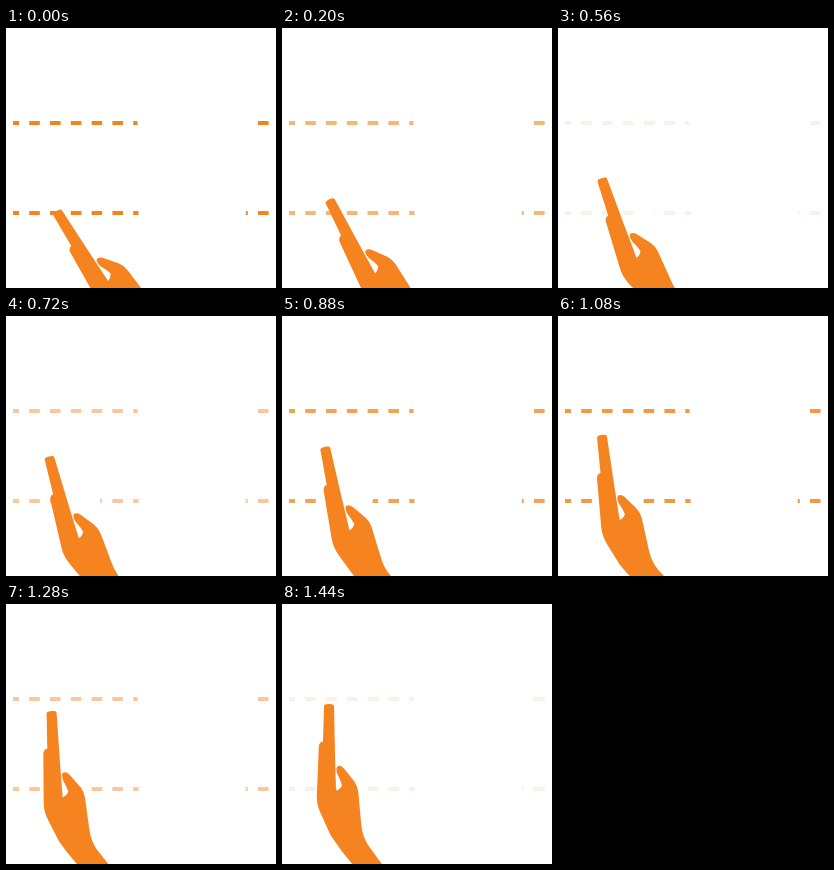
Animation of 270 by 260 pixels, one loop 1.48 s. Source, as an HTML page:

```html
<!DOCTYPE html>
<html lang="en">
<head>
<meta charset="utf-8">
<title>Swipe up</title>
<style>
  html, body { margin: 0; width: 100%; height: 100%; overflow: hidden; background: #fff; }
  svg { display: block; width: 270px; height: 260px; }
</style>
</head>
<body>
<svg viewBox="0 0 270 260">
  <g id="dashes" fill="#f58420"></g>
  <g id="hand">
    <path fill="#fff" d="M52 145 H84.5 V158 L77 177 L58 172 Z"/>
    <path fill="#f58420" d="M42 102 Q42.3 100.5 44 100.2 Q47 99.6 50 100.2 Q51.7 100.5 52 102
      L53 150 L54 186.5 Q57.5 186 60 181.5 Q58.5 176 55.5 170.5
      Q53.5 164.5 55.3 162.4 Q58.5 160.6 62 164.5 L72 177
      Q75.5 181.5 76.3 188 L79 218 Q80 232 86 241 L102 263 L125 292 L92 292
      L71 261 Q58 246 48.5 231 L38.5 209 Q34.7 201 34.8 192
      L36.8 143 Q37 138 41 137.5 Z"/>
  </g>
</svg>
<script>
  const LOOP = 1480, STEP = 40, BLINK = 1000;
  const TURN = 31.8, TURN_MS = 1400, PIVOT = "194.6 135.2";
  const PITCH = 20.8, DASH = 10.6;

  const dashes = document.getElementById("dashes");
  const hand = document.getElementById("hand");

  function addDash(x0, x1, y) {
    const r = document.createElementNS("http://www.w3.org/2000/svg", "rect");
    r.setAttribute("x", x0);
    r.setAttribute("y", y);
    r.setAttribute("width", x1 - x0);
    r.setAttribute("height", 4);
    dashes.append(r);
  }

  // A dashed row, kept only inside [7, left] and [right, 263].
  function addRow(y, left, right) {
    for (let i = 0; i < 13; i++) {
      const a = 2.4 + i * PITCH, b = a + DASH;
      for (const [lo, hi] of [[7, left], [right, 263]]) {
        const x0 = Math.max(a, lo), x1 = Math.min(b, hi);
        if (x1 > x0) addDash(x0, x1, y);
      }
    }
  }

  function draw(ms) {
    const t = Math.floor((ms % LOOP) / STEP) * STEP;
    const fade = Math.abs(1 - 2 * (t % BLINK) / BLINK);
    const tilt = TURN * Math.max(0, 1 - t / TURN_MS);
    dashes.setAttribute("opacity", fade);
    hand.setAttribute("transform", `rotate(${-tilt} ${PIVOT})`);
  }

  addRow(93, 131.5, 250);
  addRow(183, 132.5, 239.8);

  let start;
  function tick(now) {
    start ??= now;
    draw(now - start);
    requestAnimationFrame(tick);
  }
  draw(0);
  requestAnimationFrame(tick);
</script>
</body>
</html>
```
